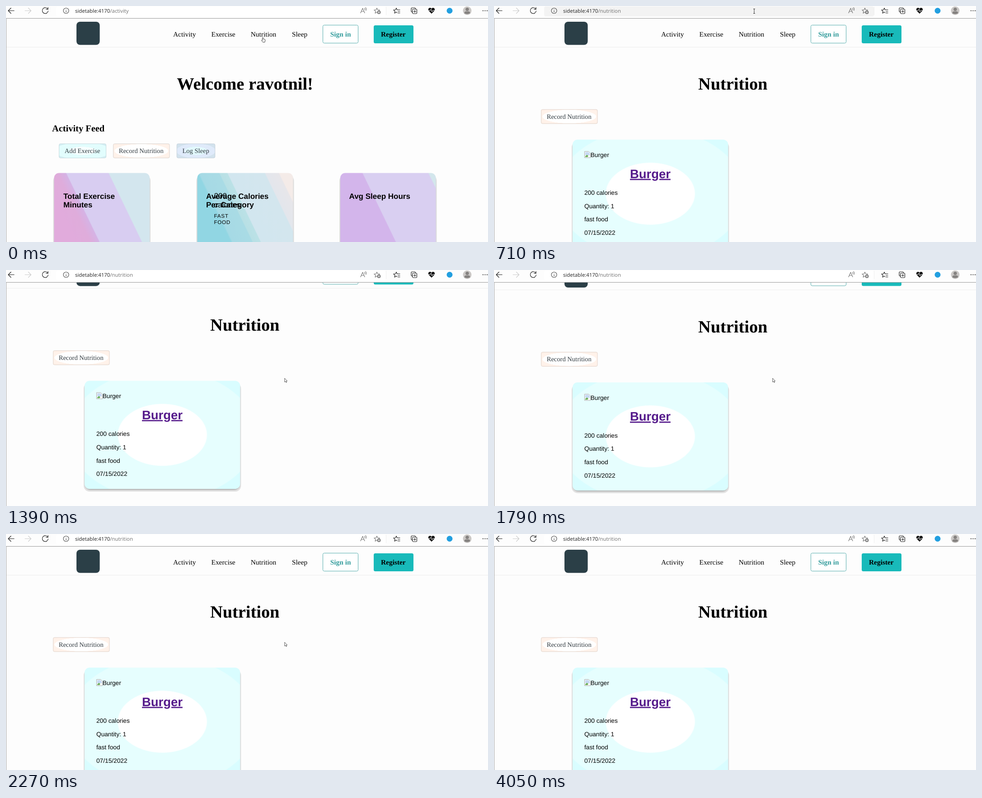
Animation of 1067x525 px, one loop 5200 ms. Source, as an HTML page:

```html
<!DOCTYPE html>
<html lang="en">
<head>
<meta charset="utf-8">
<title>Health tracker</title>
<style>
  html, body { margin: 0; width: 100%; height: 100%; overflow: hidden; background: #fdfdfd; }
  svg { display: block; text-rendering: geometricPrecision; }
  .serif { font: 15.4px "Liberation Serif", "Times New Roman", serif; }
  .sans { font: 13.7px "Liberation Sans", Arial, sans-serif; }
  .ui { font: 11.4px "Open Sans", sans-serif; }
  .bold { font-weight: bold; }
  .title { font-size: 38.4px; font-weight: bold; text-anchor: middle; }
  .label { font-size: 14.55px; fill: #333c42; }
  .head { font-size: 17px; font-weight: bold; }
  .line { fill: none; stroke: #222; stroke-width: 1.2; stroke-linecap: round; stroke-linejoin: round; }
  .soft { filter: blur(1.5px); }
</style>
</head>
<body>
<svg id="stage" width="1067" height="525" viewBox="0 0 1067 525"></svg>
<script>
const LOOP = 5200;

// [time, scroll offset]
const scrolls = [[0, 0], [1390, 50.8], [1520, 53], [1790, 47.4], [1970, 5], [2270, 0]];

// [time, x, y, pointer shape]
const pointer = [
  [0, 565, 69, "hand"], [510, 559, 52, "hand"], [710, 574, 6, "beam"],
  [850, 590, 167, "arrow"], [990, 616, 240, "arrow"], [2500, 781, 167, "arrow"],
  [2720, 836, 103, "arrow"], [2860, 836, 101, "arrow"], [3150, 900, 262, "arrow"],
  [3270, 956, 415, "arrow"], [3670, 985, 473, "arrow"], [3810, 1002, 496, "arrow"],
  [3930, 1012, 514, "arrow"], [4050, 1012, 540, "arrow"]
];

let ids = 0;
const stops = list => list.map(([o, c]) => `<stop offset="${o}" stop-color="${c}"/>`).join("");
const text = (x, y, s, cls = "", more = "") => `<text x="${x}" y="${y}" class="${cls}" ${more}>${s}</text>`;
const line = (d, more = "") => `<path class="line" d="${d}" ${more}/>`;

// Concentric ellipses reaching the corners of the box
function radial(inner, a, middle, b, outer) {
  const id = "g" + ids++;
  const list = [[a, inner], [a + .01, middle], [b, middle], [b + .01, outer]];
  return [id, `<radialGradient id="${id}" r=".7071">${stops(list)}</radialGradient>`];
}

// Slanted bands; positions are measured along the top edge, from -80 to 220
function bands(x, y, list) {
  const id = "g" + ids++;
  return [id, `<linearGradient id="${id}" gradientUnits="userSpaceOnUse" x1="-80" x2="220"
    gradientTransform="translate(${x} ${y}) skewX(25.7)">
    ${stops(list.map(([p, c]) => [(p + 80) / 300, c]))}</linearGradient>`];
}

const card = (x, y, w, h, [id, paint]) => `${paint}
  <rect x="${x - 2}" y="${y + 4}" width="${w + 4}" height="${h + 2}" rx="13" fill="#e4e4e4"/>
  <rect x="${x + 1}" y="${y + 6}" width="${w - 2}" height="${h - 4}" rx="12" fill="#aaa" class="soft"/>
  <rect x="${x}" y="${y}" width="${w}" height="${h}" rx="11" fill="url(#${id})"/>`;

const button = (x, y, w, s, border, [id, paint]) => `${paint}
  <rect x="${x + .5}" y="${y + .5}" width="${w - 1}" height="31.5" rx="3" fill="url(#${id})" stroke="${border}"/>
  ${text(x + 12.7, y + 21, s, "label")}`;

const peach = () => radial("#fff", .67, "#fff2ea", .86, "#fff0e7");

const nav = `<g class="serif">
  <rect x="156" y="35" width="51.5" height="51.5" rx="8" fill="#2b3f47"/>
  ${text(370, 68, "Activity")}${text(454.5, 68, "Exercise")}
  ${text(541.7, 68, "Nutrition")}${text(633, 68, "Sleep")}
  <rect x="701.5" y="42.5" width="78" height="40" rx="3" fill="#fff" stroke="#55adad"/>
  ${text(717.7, 68, "Sign in", "bold", 'fill="#349c9c"')}
  <rect x="814" y="43" width="88" height="40" rx="3.5" fill="#18baba"/>
  ${text(830, 68, "Register", "bold")}
  <path d="M0 91.5H1067" stroke="#ededed"/>
</g>`;

const activity = `<g id="activity" class="serif">
  ${text(529, 186, "Welcome ravotnil!", "title")}
  ${text(102, 279, "Activity Feed", "bold", 'style="font-size:20.4px"')}
  ${button(117, 306, 105, "Add Exercise", "#c3dade", radial("#f6ffff", .4, "#e2fdfd", .84, "#d4eef3"))}
  ${button(237, 306, 125.5, "Record Nutrition", "#d9d3cf", peach())}
  ${button(377.7, 306, 85.5, "Log Sleep", "#c4d0da", radial("#e2f9fd", .41, "#dfeafa", .72, "#d2e2ed"))}
  ${card(106.5, 371.5, 211.5, 180, bands(106, 371, [[-30, "#e1abdc"], [7, "#dfacdb"], [26, "#d5b3e5"],
    [28, "#d8cdf1"], [120, "#d8cdf1"], [122, "#d3e6ee"]]))}
  ${card(423.5, 371.5, 212, 180, bands(423, 371, [[1, "#91d6e3"], [5, "#a6dae5"], [48, "#a9dbe5"], [50, "#b8e0e5"],
    [66, "#bbe1e6"], [68, "#d2e6ef"], [149, "#d3e6ee"], [151, "#e3e6ec"], [180, "#e7e6ea"], [182, "#f4ebe8"]]))}
  ${card(740, 371.5, 211.5, 180, bands(739, 371, [[49, "#d3b5eb"], [51, "#d9cff1"], [195, "#d9cff1"], [197, "#d3e6ec"]]))}
  <g class="sans">
    ${text(127, 429, "Total Exercise", "head")}${text(127, 448, "Minutes", "head")}
    ${text(443, 429, "Average Calories", "head")}${text(443, 448, "Per Category", "head")}
    ${text(759.5, 429, "Avg Sleep Hours", "head")}
    <g style="font-size:17px">${text(460.5, 428, "200")}${text(460.5, 448, "calories")}</g>
    <g style="font-size:11.6px;letter-spacing:.75px">${text(460.5, 471, "FAST")}${text(460.5, 485, "FOOD")}</g>
  </g>
</g>`;

const nutrition = `<g id="nutrition" class="serif">
  ${text(528.7, 186, "Nutrition", "title")}
  ${button(104, 229.7, 125.5, "Record Nutrition", "#e0d3cb", peach())}
  ${card(174, 297.3, 344.3, 240.5, radial("#fff", .4, "#e6fefe", .85, "#d9fdff"))}
  <g class="sans">
    <path d="M200.5 323.5H209.5L213.5 327.5V337.5H200.5Z" fill="#fff" stroke="#aaa"/>
    <path d="M202 325H209L212 328V332H202Z" fill="#c6d9f3"/>
    <path d="M202 336V334L206 331L209 334L207 336Z" fill="#6cae58"/>
    ${text(213.7, 336, "Burger")}
    ${text(301, 382.5, "Burger", "bold", 'style="font-size:27.4px;text-decoration:underline" fill="#551a8b"')}
    ${["200 calories", "Quantity: 1", "fast food", "07/15/2022"].map((s, i) => text(200, 420 + i * 29.7, s)).join("")}
  </g>
</g>`;

const star = (x, y) => `M${x} ${y - 6}l1.8 4 4.4.4-3.3 2.9 1 4.2-3.9-2.2-3.9 2.2 1-4.2-3.3-2.9 4.4-.4z`;
const browser = `
  <rect width="1067" height="27" fill="#fdfdfd"/>
  <rect id="bar" x="111" y="1" width="730" height="22" rx="4" fill="#fff"/>
  <path d="M0 27.5H1067" stroke="#999"/>
  <path d="M.5 27V525" stroke="#aaa"/>
  ${line("M18 10.5H5M11 4.5L5 10.5L11 16.5")}
  ${line("M42 10.5H55M49.5 4.5L55.5 10.5L49.5 16.5", 'style="stroke:#ccc"')}
  ${line("M92.5 7A6.5 6.5 0 1 0 93.3 11M93 3V7.5H88.5")}
  <g style="opacity:.75">${line("M139 10.5A6 6 0 1 1 127 10.5A6 6 0 1 1 139 10.5M133 10V13.5M133 7.3V7.5")}</g>
  <g class="ui">${text(153, 15, 'sidetable:4170<tspan id="path" fill="#707070"></tspan>', "", 'fill="#222"')}</g>
  <g style="opacity:.6">
    ${line("M785 15.5L789.5 5L794 15.5M786.5 12H792.5M793.5 5Q795 7 794.5 9M796 3.5Q798.5 6.5 797 10")}
    ${line(star(821, 10.5))}
    <circle cx="825.5" cy="14" r="4" fill="#333"/>
    <path d="M823.5 14h4M825.5 12v4" stroke="#fff"/>
  </g>
  <path d="M841.5 2V20" stroke="#eee"/>
  ${line(star(864, 10.5))}
  <path d="M866 8h8v9h-8z" fill="#fdfdfd"/>
  ${line("M866.5 8.5H872M867.5 12H872M867.5 15.5H872")}
  ${line("M899.5 13.5Q897 13.5 897 11V6Q897 4 899 4H904Q906.5 4 906.5 6.5M901 7H908Q909.5 7 909.5 8.5V15.5Q909.5 17 908 17H901.5Q900 17 900 15.5V8.5Q900 7 901 7M905 9.5V14.5M902.5 12H907.5")}
  <path d="M942 17L936 11C932 6 939 1 942 6C945 1 952 6 948 11Z" fill="#111"/>
  <path d="M935 10h4l2-3 2 6 2-3h4" fill="none" stroke="#fff"/>
  <circle cx="982" cy="10.5" r="6.5" fill="#229fe0"/>
  <circle cx="1021" cy="10.5" r="9.5" fill="#cbc8c6"/>
  <circle cx="1021" cy="7.5" r="3.7" fill="#858280"/>
  <path d="M1014.5 16Q1015 12 1018 12H1024Q1027 12 1027.5 16Q1021 20 1014.5 16Z" fill="#858280"/>
  ${[1056, 1060.5, 1065].map(x => `<circle cx="${x}" cy="10.5" r="1.1" fill="#222"/>`).join("")}`;

const shapes = {
  arrow: '<path d="M.8.8V9.3L2.7 7.5L4.2 10.5L5.5 9.9L4.2 7H6.6Z" fill="#fff" stroke="#333" stroke-width=".8"/>',
  hand: '<path d="M2.5 7V1.5Q3.5 0 4.5 1.5V4.5L8 5.3Q9 5.7 8.8 7L8 11.5H3.5L.6 7.5Q1 6 2.5 7.5Z" fill="#fff" stroke="#333" stroke-width=".9"/>',
  beam: '<path d="M0 .5H4M2 .5V10.5M0 10.5H4" fill="none" stroke="#333"/>'
};

const $ = id => document.getElementById(id);
$("stage").innerHTML = `<rect width="1067" height="525" fill="#fdfdfd"/>
  <g id="page">${nav}${activity}${nutrition}</g>${browser}
  <g id="cursor">${Object.entries(shapes).map(([k, s]) => `<g id="${k}">${s}</g>`).join("")}</g>`;

const at = (list, t) => list.findLast(step => step[0] <= t);
const show = (id, on) => $(id).setAttribute("visibility", on ? "visible" : "hidden");

function draw(now) {
  const t = now % LOOP;
  const first = t < 290;
  const [, x, y, kind] = at(pointer, t);
  show("activity", first);
  show("nutrition", !first);
  $("path").textContent = first ? "/activity" : "/nutrition";
  $("page").setAttribute("transform", `translate(0 ${-at(scrolls, t)[1]})`);
  $("cursor").setAttribute("transform", `translate(${x} ${y})`);
  for (const k in shapes) show(k, k === kind);
  $("bar").setAttribute("fill", kind === "beam" ? "#f3f3f3" : "#fff");
  requestAnimationFrame(draw);
}
draw(0);
</script>
</body>
</html>
```
